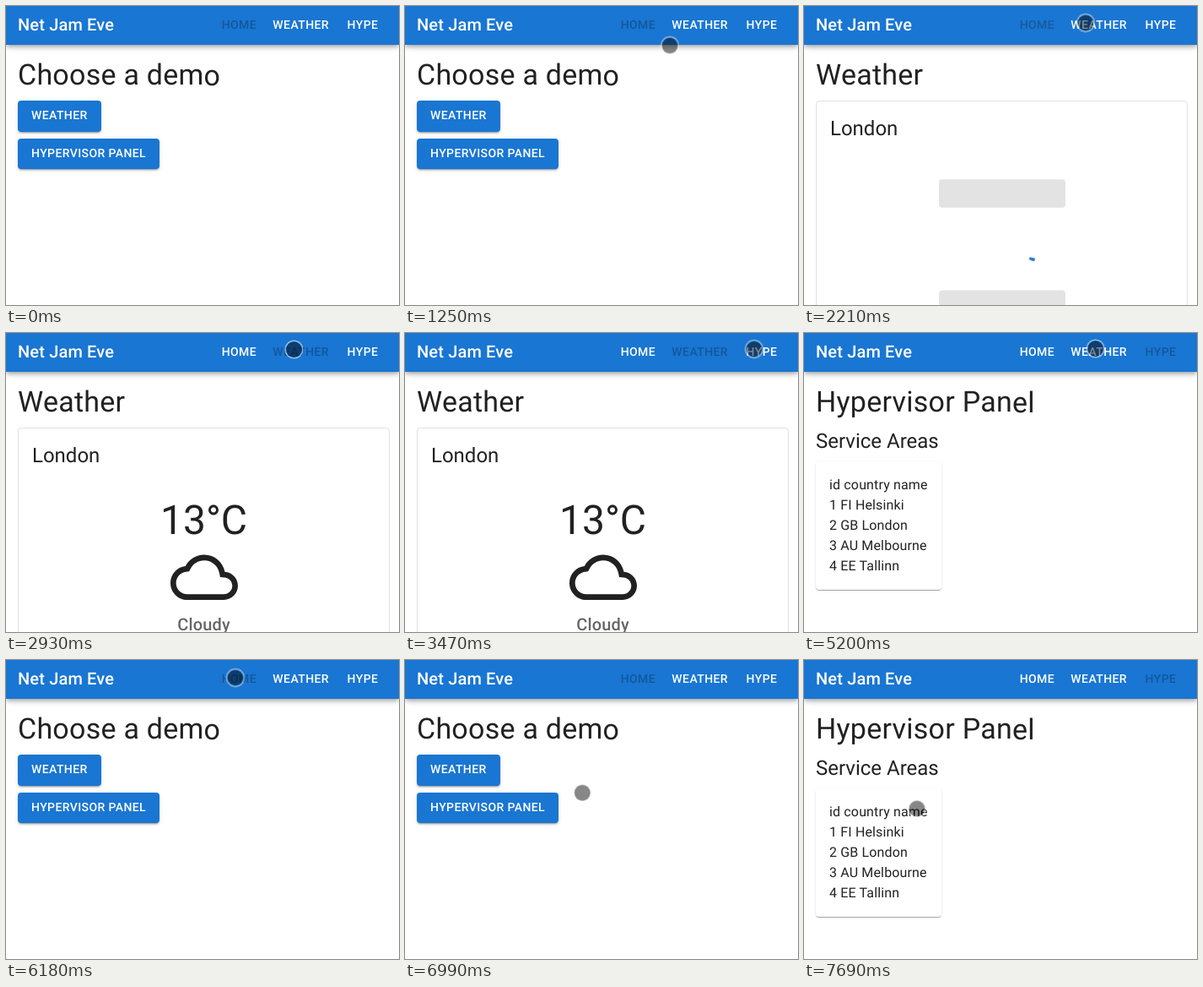
An HTML page that plays this animation: 466x354 px, repeating every 8000 ms.

```html
<!DOCTYPE html>
<html lang="en">
<head>
<meta charset="utf-8">
<title>Demo chooser</title>
<style>
  :root {
    --ink: rgba(0, 0, 0, .87);
    --off: rgba(0, 0, 0, .26);
    --blue: #1976d2;
    --loop: 8s;
    --fine: rotate(.01deg); /* lets baselines sit between pixels */
  }
  * { box-sizing: border-box; margin: 0; }
  html, body { width: 100%; height: 100%; overflow: hidden; background: #fff; }
  body {
    position: relative; color: var(--ink);
    font: 400 16px/24px Roboto, sans-serif; letter-spacing: .15px;
    text-rendering: geometricPrecision;
  }

  header {
    position: absolute; z-index: 2; left: 0; top: -2px; width: 466px; height: 48px;
    padding-left: 14px; background: var(--blue); color: #fff;
    box-shadow: 0 2px 4px -1px rgba(0, 0, 0, .2), 0 4px 5px rgba(0, 0, 0, .14), 0 1px 10px rgba(0, 0, 0, .12);
  }
  header b { font-size: 20px; line-height: 48px; font-weight: 500; }
  nav {
    position: absolute; inset: 0 11px 0 0; display: flex;
    justify-content: flex-end; align-items: center;
    transform: translateY(.5px) var(--fine);
  }
  .btn {
    display: block; min-width: 64px; padding: 6px 16px; border-radius: 4px;
    font-size: 14px; line-height: 24.5px; font-weight: 500; letter-spacing: .4px;
    text-align: center; text-transform: uppercase; white-space: nowrap;
  }
  nav .btn { padding: 6px 8px; animation: var(--loop) cubic-bezier(.4, 0, .2, 1) infinite; }
  nav .home { animation-name: nav-home; }
  nav .weather { animation-name: nav-weather; }
  nav .hype { animation-name: nav-hype; }

  main { position: absolute; left: 14px; top: 62px; width: 441px; animation: var(--loop) step-end infinite; }
  #home { animation-name: show-home; }
  #weather { animation-name: show-weather; }
  #panel { animation-name: show-panel; }
  h1 {
    height: 42px; margin-bottom: 8px; font-size: 34px; line-height: 42px; font-weight: 400;
    letter-spacing: .25px; transform: translateY(-.5px) var(--fine);
  }
  h2 { font-size: 24px; line-height: 32px; font-weight: 400; letter-spacing: 0; }

  main .btn {
    width: max-content; margin-bottom: 8px; background: var(--blue); color: #fff;
    box-shadow: 0 3px 1px -2px rgba(0, 0, 0, .2), 0 2px 2px rgba(0, 0, 0, .14), 0 1px 5px rgba(0, 0, 0, .12);
  }

  .city { position: relative; height: 300px; padding: 16px; border: 1px solid rgba(0, 0, 0, .12); border-radius: 4px; }
  .state { position: absolute; left: 0; right: 0; top: 81px; text-align: center; animation: var(--loop) step-end infinite; }
  .loading { animation-name: loading; }
  .loaded { animation-name: loaded; }
  .temp { height: 56px; font-size: 48px; line-height: 56px; letter-spacing: 0; transform: var(--fine); }
  .state svg { display: block; width: 80px; height: 80px; margin: 0 auto; }
  .sky { color: rgba(0, 0, 0, .6); font-size: 20px; line-height: 32px; font-weight: 500; }
  .loaded svg, .sky { transform: translateY(-.75px) var(--fine); }
  .bone { width: 150px; margin: 0 auto; border-radius: 4px / 6.7px; background: rgba(0, 0, 0, .11); transform: scaleY(.6); }
  .ring { animation: spin var(--loop) linear infinite; }
  .ring circle {
    fill: none; stroke: var(--blue); stroke-width: 3.6;
    animation: dash var(--loop) ease-in-out infinite;
  }

  .areas { animation: areas var(--loop) step-end infinite; }
  .list {
    width: max-content; margin-top: 8px; padding: 16px; border-radius: 4px; white-space: pre;
    box-shadow: 0 2px 1px -1px rgba(0, 0, 0, .2), 0 1px 1px rgba(0, 0, 0, .14), 0 1px 3px rgba(0, 0, 0, .12);
  }
  .list p { transform: var(--fine); }

  .dot {
    position: absolute; z-index: 3; left: -9.5px; top: -10px; width: 19px; height: 19px;
    border-radius: 50%; background: rgba(0, 0, 0, .47);
    box-shadow: 0 0 0 1.5px rgba(255, 255, 255, .55);
    animation: move var(--loop) linear infinite, enter var(--loop) step-end infinite;
  }

  @keyframes nav-home {
    0%, 27.375%, 77.125%, 93% { color: var(--off); }
    30.375%, 74.125%, 96%, 100% { color: #fff; }
  }
  @keyframes nav-weather {
    0%, 27.375%, 48.25%, 100% { color: #fff; }
    30.375%, 45.25% { color: var(--off); }
  }
  @keyframes nav-hype {
    0%, 45.25%, 77.125%, 93% { color: #fff; }
    48.25%, 74.125%, 96%, 100% { color: var(--off); }
  }

  @keyframes show-home { 0%, 74.375% { opacity: 1; } 27.625%, 93.25%, 100% { opacity: 0; } }
  @keyframes show-weather { 0%, 45.5%, 100% { opacity: 0; } 27.625% { opacity: 1; } }
  @keyframes show-panel { 0%, 74.375% { opacity: 0; } 45.5%, 93.25%, 100% { opacity: 1; } }
  @keyframes loading { 0% { opacity: 1; } 29.125%, 100% { opacity: 0; } }
  @keyframes loaded { 0% { opacity: 0; } 29.125%, 100% { opacity: 1; } }
  @keyframes areas { 0% { opacity: 0; } 56.75%, 100% { opacity: 1; } }
  @keyframes spin { 0%, 27.04% { transform: rotate(0); } 44.54%, 100% { transform: rotate(360deg); } }
  @keyframes dash {
    0%, 27.04% { stroke-dasharray: 1px, 200px; stroke-dashoffset: 0; }
    35.79%, 100% { stroke-dasharray: 100px, 200px; stroke-dashoffset: -15px; }
  }

  @keyframes enter { 0% { opacity: 0; } 9.75%, 100% { opacity: 1; } }
  @keyframes move {
    0%, 9.75% { transform: translate(88.5px, 118px); }
    11.875%, 13.4% { transform: translate(376px, 68.5px); }
    14.125% { transform: translate(357px, 65px); }
    14.875% { transform: translate(330px, 57px); }
    15.625% { transform: translate(313.5px, 47.5px); }
    16.375% { transform: translate(314px, 38px); }
    17.125% { transform: translate(320px, 29px); }
    17.875% { transform: translate(328px, 22px); }
    18.625%, 20.2% { transform: translate(332.5px, 18.5px); }
    20.875% { transform: translate(333px, 19.5px); }
    22.375%, 35.9% { transform: translate(333.5px, 20.5px); }
    38.125% { transform: translate(356px, 19px); }
    40.375% { transform: translate(393px, 18.5px); }
    43.375%, 59% { transform: translate(413.5px, 19.5px); }
    59.75%, 62% { transform: translate(413.5px, 20.5px); }
    62.75% { transform: translate(404px, 20px); }
    65% { transform: translate(345.5px, 19px); }
    67.25% { transform: translate(287px, 19.5px); }
    69.25% { transform: translate(268.5px, 20.5px); }
    71.5%, 79.5% { transform: translate(271.5px, 21.5px); }
    80.25% { transform: translate(276px, 25px); }
    82.5% { transform: translate(306px, 52px); }
    84% { transform: translate(314.5px, 84px); }
    85.5% { transform: translate(290px, 120px); }
    87.5% { transform: translate(205px, 160px); }
    89.625%, 90.3% { transform: translate(134.5px, 177px); }
    91%, 100% { transform: translate(133.5px, 176.5px); }
  }
</style>
</head>
<body>
  <header>
    <b>Net Jam Eve</b>
    <nav>
      <span class="btn home">Home</span>
      <span class="btn weather">Weather</span>
      <span class="btn hype">Hype</span>
    </nav>
  </header>

  <main id="home">
    <h1>Choose a demo</h1>
    <span class="btn">Weather</span>
    <span class="btn">Hypervisor Panel</span>
  </main>

  <main id="weather">
    <h1>Weather</h1>
    <div class="city">
      <h2>London</h2>
      <div class="state loading">
        <div class="temp bone"></div>
        <svg class="ring" viewBox="22 22 44 44"><circle cx="44" cy="44" r="20.2"/></svg>
        <div class="sky bone">&nbsp;</div>
      </div>
      <div class="state loaded">
        <div class="temp">13°C</div>
        <svg viewBox="0 0 24 24" fill="currentColor"><path d="M19.35 10.04C18.67 6.59 15.64 4 12 4 9.11 4 6.6 5.64 5.35 8.04 2.34 8.36 0 10.91 0 14c0 3.31 2.69 6 6 6h13c2.76 0 5-2.24 5-5 0-2.64-2.05-4.78-4.65-4.96zM19 18H6c-2.21 0-4-1.79-4-4 0-2.05 1.53-3.76 3.56-3.97l1.07-.11.5-.95C8.08 7.14 9.94 6 12 6c2.62 0 4.88 1.86 5.39 4.43l.3 1.5 1.53.11c1.56.1 2.78 1.41 2.78 2.96 0 1.65-1.35 3-3 3z"/></svg>
        <div class="sky">Cloudy</div>
      </div>
    </div>
  </main>

  <main id="panel">
    <h1>Hypervisor Panel</h1>
    <div class="areas">
      <h2>Service Areas</h2>
      <div class="list"><p>id country name
1 FI Helsinki
2 GB London
3 AU Melbourne
4 EE Tallinn</p></div>
    </div>
  </main>

  <div class="dot"></div>
</body>
</html>
```
